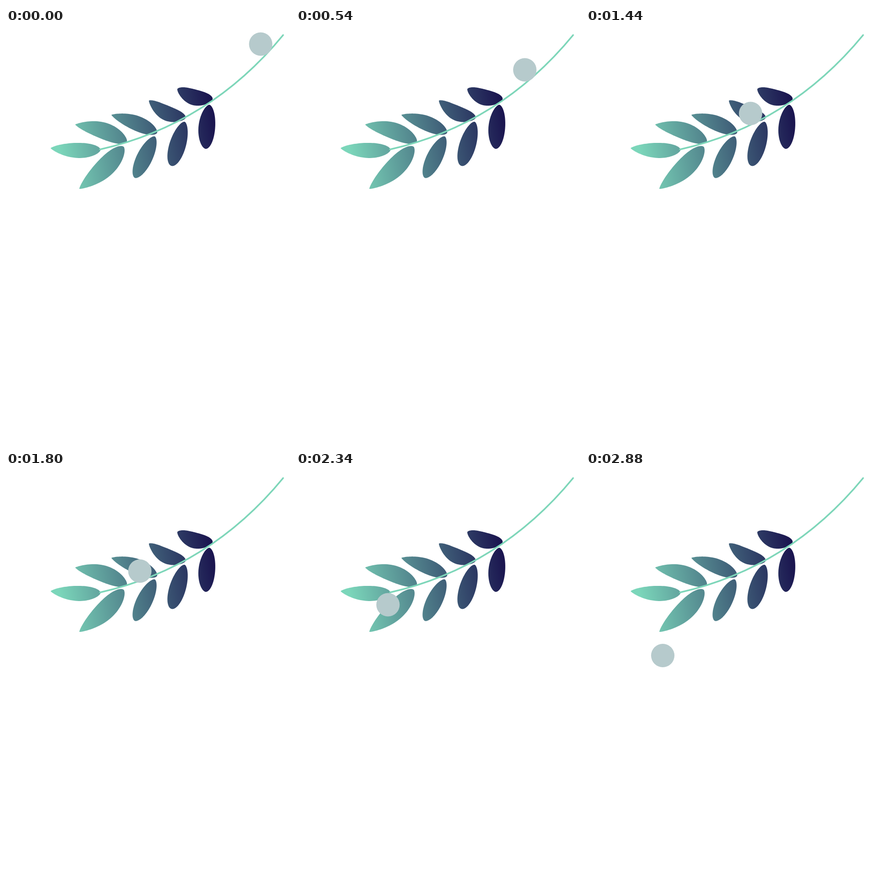
These frames come from a looping animation (620 by 903 pixels, 2.94 s). An HTML page with a canvas:

```html
<!DOCTYPE html>
<html lang="en">
<head>
<meta charset="utf-8">
<title>Branch</title>
<style>
  html, body { margin: 0; width: 100%; height: 100%; overflow: hidden; background: #fff; }
  canvas { display: block; }
</style>
</head>
<body>
<canvas id="stage" width="620" height="903"></canvas>
<script>
const ctx = document.getElementById('stage').getContext('2d');
const LOOP = 2940, STEP = 60;

const leaves = [
  leaf(206.5, 265, 97.5, 261.5, 16.5, -3, 0.8),
  leaf(264, 247, 151, 210, 18.2, 6.4, 0.85),
  leaf(330, 228, 230, 189, 16.3, 3, 0.85),
  leaf(392, 196, 312, 158, 16.2, -8, 0.75),
  leaf(451, 155, 374, 133, 17.2, -7, 0.65),
  leaf(257, 258.5, 160, 350, 20.7, -4.8, 0.85),
  leaf(325, 236, 281, 326, 17.3, 0, 0.55),
  leaf(390, 204, 361, 300, 18, 0, 0.5),
  leaf(444, 167, 436, 263, 18.2, 1.5, 0.55)
];

const stem = new Path2D('M205 264.3Q445 209.5 605 15.3');

// Ball: time, x, y
const keys = [
  [0, 556, 35], [540, 499.5, 91], [960, 441.7, 135.5], [1440, 359.3, 186],
  [2100, 238.3, 250], [2580, 169, 340.7], [2700, 166.5, 374.5], [2880, 167.6, 401.5]
];

// Leaf from base to tip: half width, sideways bend of the midrib, taper of the tip
function leaf(x0, y0, x1, y1, width, bend, taper) {
  const dx = x1 - x0, dy = y1 - y0, len = Math.hypot(dx, dy);
  const round = 0.6, n = 48, path = new Path2D();
  const swell = u => u ** round * (1 - u) ** taper;
  const peak = swell(round / (round + taper));
  for (let i = 0; i < 2 * n; i++) {
    const a = i / n * Math.PI, u = (1 - Math.cos(a)) / 2;
    const side = i < n ? 1 : -1;
    const off = bend * Math.sin(Math.PI * u) + side * width * swell(u) / peak;
    path.lineTo(x0 + dx * u - dy / len * off, y0 + dy * u + dx / len * off);
  }
  path.closePath();
  return path;
}

function slope(i, c) {
  const a = keys[Math.max(i - 1, 0)], b = keys[Math.min(i + 1, keys.length - 1)];
  return (b[c] - a[c]) / (b[0] - a[0]);
}

// Cubic Hermite interpolation of coordinate c
function along(t, c) {
  let i = 0;
  while (i < keys.length - 2 && t > keys[i + 1][0]) i++;
  const a = keys[i], b = keys[i + 1], d = b[0] - a[0];
  const u = (t - a[0]) / d, v = 1 - u;
  return a[c] * v * v * (1 + 2 * u) + b[c] * u * u * (3 - 2 * u)
    + d * u * v * (slope(i, c) * v - slope(i + 1, c) * u);
}

const shade = ctx.createLinearGradient(115, 258, 452, 200);
shade.addColorStop(0, '#7bd6ba');
shade.addColorStop(1, '#1b1650');

function draw(t) {
  ctx.fillStyle = '#fff';
  ctx.fillRect(0, 0, 620, 903);
  ctx.fillStyle = shade;
  leaves.forEach(shape => ctx.fill(shape));
  ctx.strokeStyle = '#7dd6b9';
  ctx.lineWidth = 3.5;
  ctx.lineCap = 'round';
  ctx.stroke(stem);
  ctx.fillStyle = '#b6cacc';
  ctx.beginPath();
  ctx.arc(along(t, 1), along(t, 2), 25.5, 0, Math.PI * 2);
  ctx.fill();
}

const start = performance.now();
function tick() {
  const t = (performance.now() - start) % LOOP;
  draw(Math.floor(t / STEP) * STEP);
  requestAnimationFrame(tick);
}
tick();
</script>
</body>
</html>
```
